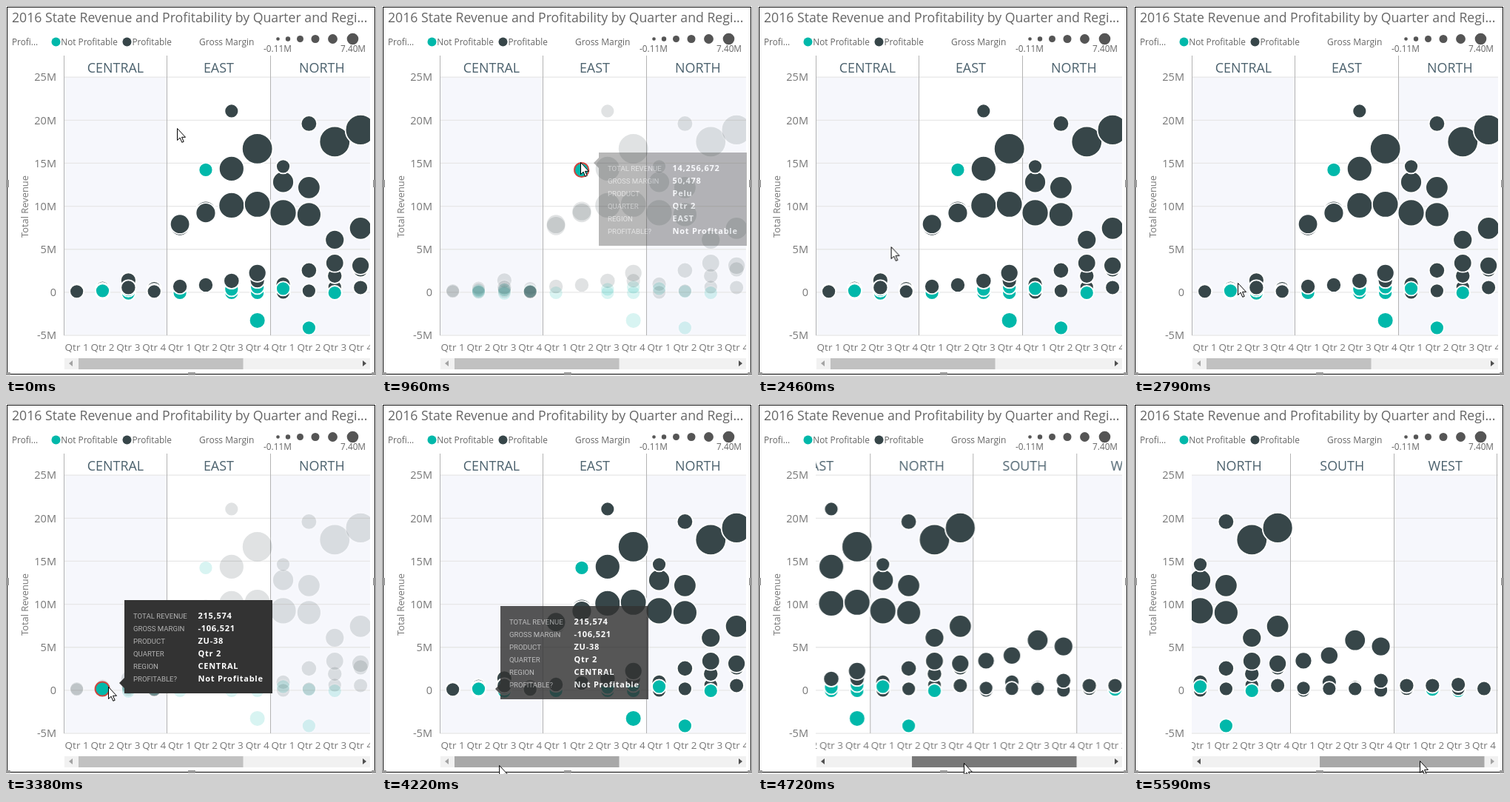
An HTML page for the animation above (5640 ms loop, 500 by 500 pixels).

```html
<!DOCTYPE html>
<html lang="en">
<head>
<meta charset="utf-8">
<title>Revenue bubbles</title>
<style>
html, body { margin: 0; width: 100%; height: 100%; overflow: hidden; background: #fff; }
svg { display: block; width: 500px; height: 500px; font-family: "Open Sans", "Noto Sans", sans-serif; fill: #777; }
.crisp { shape-rendering: crispEdges; }
.title { font-size: 17.68px; fill: #666; }
.legend { font-size: 11.8px; fill: #666; }
.axis { font-size: 14.5px; text-anchor: end; }
.quarter { font-size: 13.5px; text-anchor: middle; }
.region { font-size: 17.9px; text-anchor: middle; fill: #4b616d; }
.grid { stroke: #e7e7e7; stroke-width: 1.3; }
.divider { stroke: #b3b3b3; }
.label { font: 9.6px Roboto, sans-serif; fill: #b3b3b3; }
.value { font-size: 11px; font-weight: 700; letter-spacing: .75px; fill: #fff; }
.mark { stroke: #fff; stroke-width: 1.8; }
.hot { fill: #01b8aa; stroke: #cf4640; stroke-width: 2; }

/* One loop is 5640 ms */
.mark, .hot, .tip, #scroll, #thumb, #cursor, .arrow { animation: 5640ms linear infinite; }
.mark { animation-name: dim; animation-timing-function: step-end; }
#hot1 { animation-name: hot1; animation-timing-function: step-end; }
#hot2 { animation-name: hot2; animation-timing-function: step-end; }
#tip1 { animation-name: tip1; }
#tip2 { animation-name: tip2; }
#scroll { animation-name: scroll; }
#thumb { animation-name: drag, press; animation-timing-function: linear, step-end; }
#left { animation-name: leftArrow; animation-timing-function: step-end; }
#right { animation-name: rightArrow; animation-timing-function: step-end; }
#cursor { animation-name: point; }

@keyframes dim {
  0%, 37.94%, 70.2%, 100% { opacity: 1; }
  16.13%, 51.6% { opacity: .15; }
}
@keyframes hot1 {
  0%, 37.94%, 100% { opacity: 0; }
  16.13% { opacity: 1; }
}
@keyframes hot2 {
  0%, 70.2%, 100% { opacity: 0; }
  51.6% { opacity: 1; }
}
@keyframes tip1 {
  0%, 16.13% { opacity: 0; }
  18.44%, 21.8% { opacity: .88; }
  21.81%, 41.4% { opacity: 1; }
  43.6%, 100% { opacity: 0; }
}
@keyframes tip2 {
  0%, 51.6% { opacity: 0; transform: translate(160px, 265px); }
  53.37%, 59.92% { opacity: .88; transform: translate(160px, 265px); }
  59.93%, 68.9% { opacity: 1; transform: translate(160px, 265px); }
  68.97%, 73.8% { opacity: 1; transform: translate(160px, 273px); }
  74.82% { opacity: .84; transform: translate(160px, 273px); }
  76.6%, 100% { opacity: 0; transform: translate(160px, 273px); }
}
@keyframes scroll {
  0%, 77.48% { transform: translateX(0); }
  80.68% { transform: translateX(-45.4px); }
  85.2%, 100% { transform: translateX(-285px); }
}
@keyframes drag {
  0%, 77.48% { transform: translateX(0); }
  80.68% { transform: translateX(23px); }
  85.2%, 100% { transform: translateX(153px); }
}
@keyframes press {
  0% { fill: #c1c1c1; }
  74.1% { fill: #a8a8a8; }
  77.48% { fill: #787878; }
  91.84%, 100% { fill: #a8a8a8; }
}
@keyframes leftArrow {
  0% { fill: #a3a3a3; }
  77.6%, 100% { fill: #505050; }
}
@keyframes rightArrow {
  0% { fill: #505050; }
  85.2%, 100% { fill: #a3a3a3; }
}
@keyframes point {
  0%, 4.96% { transform: translate(231px, 165px); animation-timing-function: ease-in-out; }
  14.36%, 35.46% { transform: translate(268px, 211px); }
  35.82% { transform: translate(267px, 217px); animation-timing-function: cubic-bezier(.4, 0, .5, 1); }
  49.47% { transform: translate(140px, 374px); }
  51.6%, 67.1% { transform: translate(138px, 382px); animation-timing-function: cubic-bezier(.4, 0, .6, 1); }
  74.82% { transform: translate(158px, 488px); }
  77.48% { transform: translate(168px, 487px); animation-timing-function: ease-in; }
  80.68% { transform: translate(192px, 485px); }
  87.23% { transform: translate(378px, 485px); }
  89.18%, 96.5% { transform: translate(387px, 485px); }
  99.1%, 100% { transform: translate(386px, 482px); }
}
</style>
</head>
<body>
<svg viewBox="0 0 500 500">
  <defs><clipPath id="view"><rect x="78" y="66" width="413.4" height="408"/></clipPath></defs>
  <rect width="500" height="500" fill="#fff"/>

  <text class="title" x="8" y="22">2016 State Revenue and Profitability by Quarter and Regi...</text>
  <g class="legend">
    <text x="8" y="53">Profi...</text>
    <circle cx="67.5" cy="48.5" r="6" fill="#01b8aa"/>
    <text x="74.3" y="53">Not Profitable</text>
    <circle cx="163.5" cy="48.5" r="6" fill="#374649"/>
    <text x="170.5" y="53">Profitable</text>
    <text x="261" y="53" font-size="12">Gross Margin</text>
    <g id="sizes" fill="#555"></g>
    <text x="348" y="62.3">-0.11M</text>
    <text x="452" y="62.3">7.40M</text>
  </g>

  <g id="axis" class="axis"></g>
  <text transform="translate(30 271) rotate(-90)" text-anchor="middle" font-size="12.9">Total Revenue</text>

  <g clip-path="url(#view)">
    <g id="scroll">
      <g id="bands"></g>
      <g id="marks"></g>
      <circle id="hot1" class="hot" cx="269.7" cy="221.5" r="9.6"/>
      <circle id="hot2" class="hot" cx="130.2" cy="385" r="9.6"/>
    </g>
  </g>

  <rect class="crisp" x="79" y="476" width="413" height="15" fill="#f1f1f1"/>
  <rect id="thumb" x="98" y="476" width="222.5" height="15"/>
  <path id="left" class="arrow" d="M90 479v8l-5-4z"/>
  <path id="right" class="arrow" d="M482 479v8l5-4z"/>

  <g class="crisp">
    <path d="M1.5 1.5h497v496h-497z" fill="none" stroke="#000"/>
    <path d="M0 235h4v10h-4zM496 235h4v10h-4zM246 495h10v4h-10zM0 495h6v4h-6zM494 495h6v4h-6z" fill="#999"/>
  </g>

  <g id="tip1" class="tip" transform="translate(293 198)"></g>
  <g id="tip2" class="tip"></g>
  <path id="cursor" d="M.5.5v16l3.6-3.4 2.7 6.2 2.4-1-2.7-6h5z" fill="#fff" stroke="#000"/>
</svg>
<script>
const $ = id => document.getElementById(id);

function add(parent, tag, attrs, text) {
  const el = document.createElementNS('http://www.w3.org/2000/svg', tag);
  for (const key in attrs) el.setAttribute(key, attrs[key]);
  if (text !== undefined) el.textContent = text;
  parent.appendChild(el);
  return el;
}

const REGION_W = 139.45;
const LEFT = 78.2;
const yOf = millions => 386.9 - millions * 11.63;
const xOf = column => LEFT + (column + .5) * REGION_W / 4;

[[367.5, 2.3], [381, 3.2], [397.5, 4.5], [418, 5.5], [441.5, 6.4], [468.5, 7.8]]
  .forEach(([cx, r]) => add($('sizes'), 'circle', { cx, cy: 44.5, r }));

// Regions, grid and axis labels
const regions = ['CENTRAL', 'EAST', 'NORTH', 'SOUTH', 'WEST'];
regions.forEach((name, i) => {
  const x = LEFT + i * REGION_W;
  if (i % 2 === 0) add($('bands'), 'rect', { x, y: 96, width: REGION_W, height: 349, fill: '#f6f7fc' });
  add($('bands'), 'text', { class: 'region', x: x + REGION_W / 2, y: 90 }, name);
});
for (let m = 25; m >= -5; m -= 5) {
  const y = yOf(m);
  add($('bands'), 'path', { class: 'grid', d: `M78 ${y}H780` });
  add($('axis'), 'text', { x: 68, y: y + 5.2 }, m ? m + 'M' : '0');
}
for (let i = 0; i <= regions.length; i++) {
  const x = Math.floor(LEFT + i * REGION_W) + .5;
  add($('bands'), 'path', { class: 'divider', d: `M${x} 67V445` });
}

// Per quarter: value in millions, "t" when not profitable, "/radius" when not 9
const quarters = [
  '.2 .1',
  '.5 .3 0t .05 .18t',
  '1.38/10 .3 .1 -.1t .3t .56/9.6',
  '.45 .2t .05 .1t .05 .1 .05 .1',
  '7.7/12.8 7.93/12.8 -.05t .68/9.6',
  '14.23t 9.45/13 9.22/13 .86/9.6',
  '21.06 14.36/16.5 10.1/17 -.05t .35t 1.33/10.2',
  '16.68/20.3 10.23/17.3 -.05t .6t 1.35/9.5 2.24/11.5 -3.27t/10.4',
  '12.81/14 14.62 9.24/17.5 .95/9.5 0 .43t',
  '19.6/10.3 12.17/14.8 9.03/16 2.54/10.2 .1t .17 -4.13t',
  '17.5/20.3 6.1/12.5 .6 1.9/9.6 3.4/11.8 -.05t',
  '18.87/20 7.44/14.8 2.67/10 3.1/11.5 .56/9.4',
  '3.44/11 0 .27',
  '4.04/11.6 .95/9.5 .1 .2',
  '5.82/13.8 .35 .17',
  '5.1/12.5 0 1.12/9.8',
  '.2 .55/9.5',
  '.05 .1t .55/9.5',
  '-.05t .2 .68/9.5',
  '.25 .2/9.4'
];
quarters.forEach((spec, column) => {
  const cx = xOf(column);
  add($('bands'), 'text', { class: 'quarter', x: cx, y: 466 }, 'Qtr ' + (column % 4 + 1));
  for (const token of spec.split(' ')) {
    const [value, radius = 9] = token.split('/');
    add($('marks'), 'circle', {
      class: 'mark', cx, cy: yOf(parseFloat(value)), r: +radius + .5,
      fill: value.endsWith('t') ? '#01b8aa' : '#374649'
    });
  }
});

function tooltip(id, notchY, values) {
  const tip = $(id);
  const labels = ['TOTAL REVENUE', 'GROSS MARGIN', 'PRODUCT', 'QUARTER', 'REGION', 'PROFITABLE?'];
  add(tip, 'path', { d: `M0 0H200V126H0V${notchY + 7}L-7 ${notchY}L0 ${notchY - 7}Z`, fill: '#333' });
  labels.forEach((label, i) => {
    const y = 25 + i * 17;
    add(tip, 'text', { class: 'label', x: 12, y }, label);
    add(tip, 'text', { class: 'value', x: 99.5, y }, values[i]);
  });
}
tooltip('tip1', 14, ['14,256,672', '50,478', 'Pelu', 'Qtr 2', 'EAST', 'Not Profitable']);
tooltip('tip2', 112, ['215,574', '-106,521', 'ZU-38', 'Qtr 2', 'CENTRAL', 'Not Profitable']);
</script>
</body>
</html>
```
